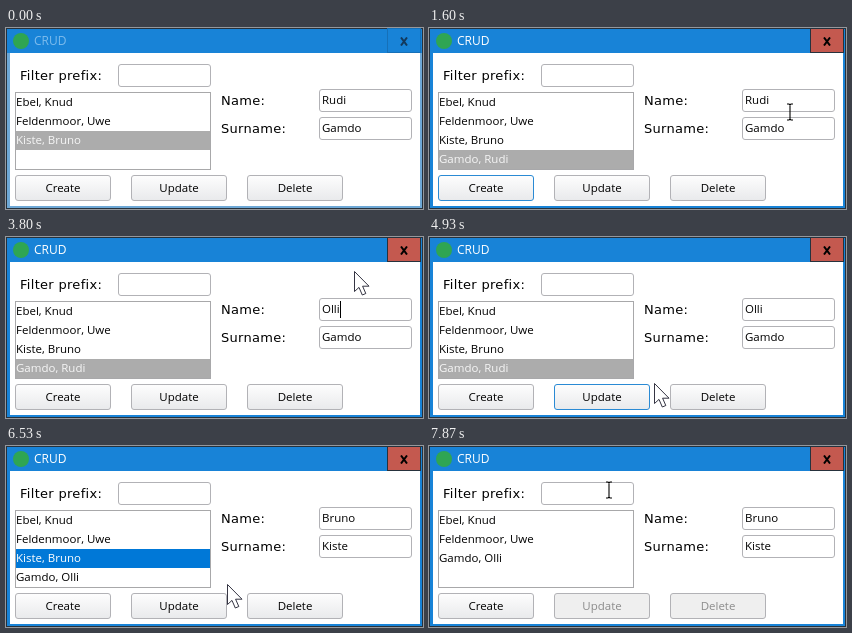
These frames come from a looping animation (417x181 px, 8000 ms). An HTML page:

```html
<!DOCTYPE html>
<html lang="en">
<head>
<meta charset="utf-8">
<title>CRUD</title>
<style>
  html, body { margin: 0; width: 100%; height: 100%; overflow: hidden; background: #222; }
  #stage { position: relative; width: 417px; height: 181px; overflow: hidden; background: #222;
    font: 11.5px "Open Sans", "Noto Sans", sans-serif; color: #000; white-space: pre; }
  #stage div { position: absolute; box-sizing: border-box; }
  #frame { left: 0; top: 0; width: 417px; height: 181px; background: #6ea8d6; border: 1px solid #26323d; }
  #bar { left: 1px; top: 1px; width: 415px; height: 24px; background: #1883d7; }
  #client { left: 4px; top: 25px; width: 410px; height: 153px; background: #fff; }
  #icon { left: 7px; top: 5px; width: 16px; height: 16px; border-radius: 50%; background: #2fa553; }
  #title { left: 28px; top: 3px; font-size: 12px; line-height: 20px; color: #7dbbec; }
  #close { left: 381px; top: 0; width: 34px; height: 25px; border: 1px solid #1670b8; }
  #close svg { position: absolute; left: 12px; top: 8px; }
  #close path { stroke: #12395c; stroke-width: 2; }
  .active #frame { background: #1883d7; }
  .active #title { color: #fff; }
  .active #close { background: #c4594f; border-color: #26323d; }
  .active #close path { stroke: #000; }
  .label { font: 13px/20px "DejaVu Sans", sans-serif; letter-spacing: .3px; }
  .field, .button { border: 1px solid #b2b2b6; border-radius: 3px; }
  .field { width: 93px; height: 23px; padding-left: 2px; line-height: 20px; background: #fff; }
  .field .selected { background: #0078d7; color: #fff; }
  .field .caret { display: inline-block; width: 1px; height: 17px; margin-right: -1px;
    vertical-align: middle; background: #000; }
  .button { top: 147px; width: 96px; height: 26px; line-height: 23px; text-align: center;
    background: linear-gradient(#fdfdfd, #e9eaec); }
  .button.focus { border-color: #2a8ad4; }
  .button.disabled { color: #8c8c8c; background: #efefef; }
  #list { left: 9px; top: 64px; width: 196px; height: 78px; border: 1px solid #a8a8aa; background: #fff; }
  #list .row { left: 0; width: 194px; height: 19px; line-height: 17px; }
  #list .gray { background: #acacac; color: #f6f6f6; }
  #list .blue { background: #0078d7; color: #fff; }
  #pointer { position: absolute; left: 0; top: 0; overflow: visible; }
</style>
</head>
<body>
<div id="stage">
  <div id="frame"></div>
  <div id="bar"></div>
  <div id="client"></div>
  <div id="icon"></div>
  <div id="title">CRUD</div>
  <div id="close"><svg width="8" height="9"><path d="M1 .5L7 8.5M7 .5L1 8.5"/></svg></div>
  <div id="list"></div>
  <svg id="pointer" width="1" height="1">
    <path id="arrow" d="M.5 .5V20.5L5 16.4L8.3 24L11.8 22.5L8.6 15.2H15Z"
      fill="#fff" stroke="#112" stroke-width=".85"/>
    <path id="beam" d="M-3 -8H-1L0 -7L1 -8H3M0 -7V7M-3 8H-1L0 7L1 8H3"
      fill="none" stroke="#000" stroke-width="1.1"/>
  </svg>
</div>
<script>
const LOOP = 8000, STEP = 1000 / 15;
const find = id => document.getElementById(id);
const stage = find('stage'), list = find('list');
const pointer = find('pointer'), arrow = find('arrow'), beam = find('beam');

function add(className, left, top, text = '', parent = stage) {
  const el = document.createElement('div');
  el.className = className;
  el.style.left = left + 'px';
  el.style.top = top + 'px';
  el.textContent = text;
  parent.insertBefore(el, parent === stage ? pointer : null);
  return el;
}

add('label', 14, 38, 'Filter prefix:');
add('label', 215, 63, 'Name:');
add('label', 215, 91, 'Surname:');
const fields = [add('field', 112, 36), add('field', 313, 61), add('field', 313, 89)];
const [, nameField, surnameField] = fields;
const buttons = ['Create', 'Update', 'Delete'].map((text, i) => add('button', 9 + 116 * i, 147, text));
const rows = [0, 1, 2, 3].map(i => add('row', 0, 19 * i, '', list));

// Each move: start, end and the place it leads to; the pointer rests in between.
const HOME = [440, 190];
const moves = [
  [0, 533, 204, 117], [533, 800, 90, 146], [800, 933, 40, 153],   // to Create
  [1200, 1600, 361, 84], [1600, 1733, 361, 77],                   // to the name field
  [2200, 2333, 348, 34],                                          // aside
  [4400, 5067, 203, 166],                                         // to Update
  [5467, 5800, 132, 121], [5800, 6333, 100, 110],                 // to the list
  [6333, 6533, 221, 138], [6533, 6800, 260, 152],                 // to Delete
  [7400, 7867, 180, 44]                                           // to the filter
];

function pointerAt(t) {
  let [x, y] = HOME;
  for (const [start, end, toX, toY] of moves) {
    const k = Math.min(1, Math.max(0, (t - start) / (end - start)));
    const eased = (k + k * k * (3 - 2 * k)) / 2;
    x += (toX - x) * eased;
    y += (toY - y) * eased;
  }
  return [Math.round(x), Math.round(y)];
}

const overField = (x, y) => fields.some(({ offsetLeft: left, offsetTop: top }) =>
  x >= left && x <= left + 93 && y >= top && y <= top + 23);

const people = ['Ebel, Knud', 'Feldenmoor, Uwe', 'Kiste, Bruno'];
const NEW_NAME = 'Olli';

// Keystrokes come faster and faster.
const typing = [...NEW_NAME].map((_, i) =>
  [3200 + i * (300 - 33 * i), { name: NEW_NAME.slice(0, i + 1), marked: false, caret: true }]);

// [time, changes]
const script = [
  [0, { people, selected: 2, tone: 'gray', name: 'Rudi', surname: 'Gamdo' }],
  [1000, { active: true, focus: 0 }],
  [1267, { people: [...people, 'Gamdo, Rudi'], selected: 3 }],
  [1867, { focus: -1, caret: true }],
  [2533, { caret: false }],
  [2867, { marked: true }],
  ...typing,
  [4267, { caret: false }],
  [4800, { caret: true }],
  [4933, { caret: false, focus: 1 }],
  [5067, { people: [...people, 'Gamdo, Olli'] }],
  [6267, { focus: -1, selected: 2, tone: 'blue' }],
  [6333, { name: 'Bruno', surname: 'Kiste' }],
  [7000, { focus: 2, tone: 'gray' }],
  [7133, { people: [...people.slice(0, 2), 'Gamdo, Olli'], selected: -1, focus: -1, locked: true }]
];

function span(className, text = '') {
  const el = document.createElement('span');
  el.className = className;
  el.textContent = text;
  return el;
}

function draw(time) {
  const t = Math.floor((time + 5) / STEP) * STEP;
  const s = Object.assign({}, ...script.filter(([at]) => at <= t + 5).map(([, change]) => change));
  stage.classList.toggle('active', !!s.active);
  rows.forEach((row, i) => {
    row.textContent = s.people[i] || '';
    row.className = i === s.selected ? 'row ' + s.tone : 'row';
  });
  buttons.forEach((button, i) => {
    button.classList.toggle('focus', i === s.focus);
    button.classList.toggle('disabled', !!s.locked && i > 0);
  });
  nameField.replaceChildren(span(s.marked ? 'selected' : '', s.name));
  if (s.caret) nameField.append(span('caret'));
  surnameField.textContent = s.surname;

  const [x, y] = pointerAt(t);
  const editing = overField(x, y);
  pointer.style.transform = `translate(${x}px, ${y}px)`;
  arrow.style.display = editing ? 'none' : '';
  beam.style.display = editing ? '' : 'none';
}

const start = performance.now();
function tick() {
  draw((performance.now() - start) % LOOP);
  requestAnimationFrame(tick);
}
tick();
</script>
</body>
</html>
```
